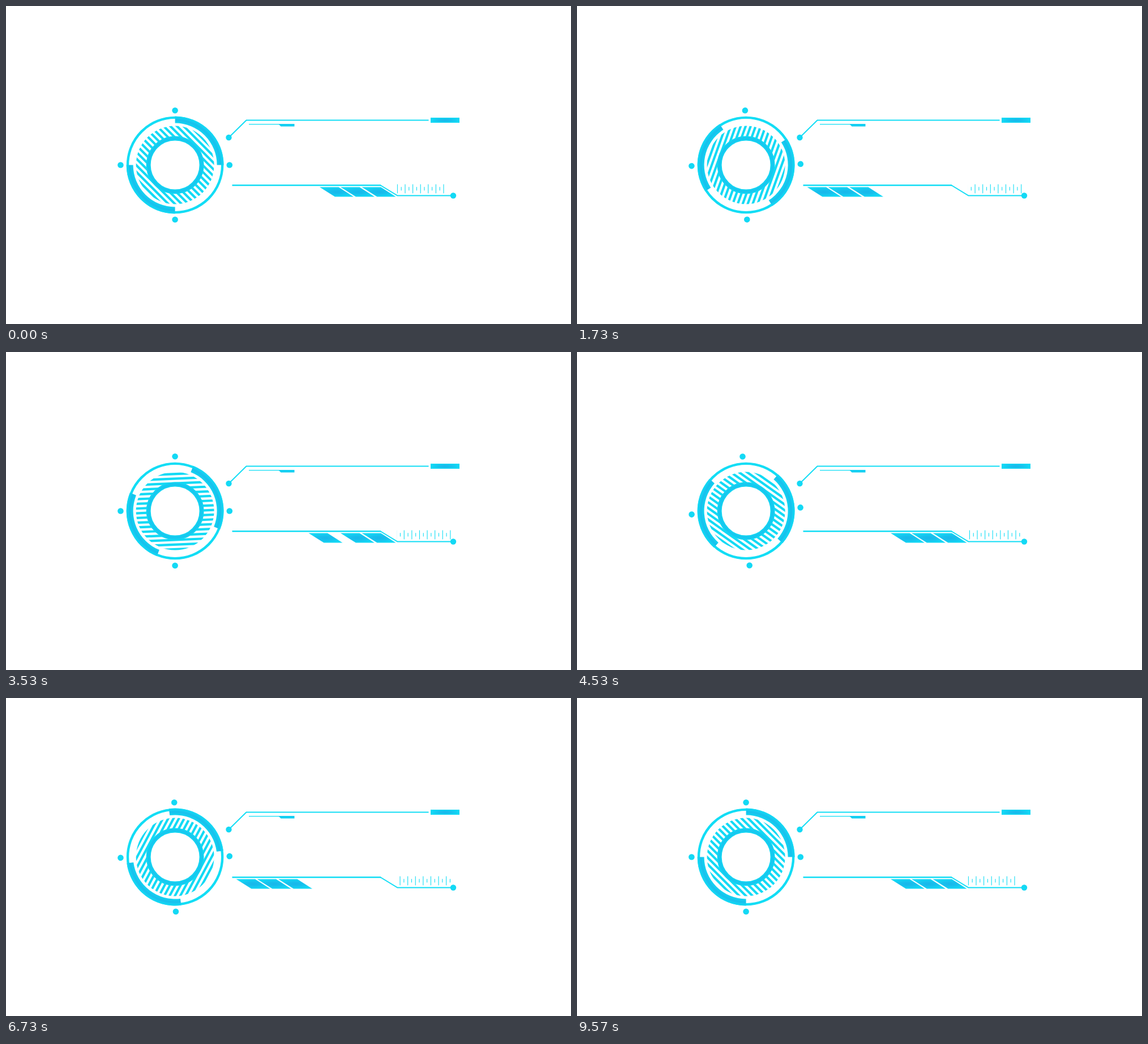
These frames come from a looping animation (998 by 561 pixels, 9.61 s). An HTML page:

```html
<!DOCTYPE html>
<html lang="en">
<head>
<meta charset="utf-8">
<title>HUD panel</title>
<style>
  html, body { margin: 0; width: 100%; height: 100%; overflow: hidden; background: #fff; }
  svg { display: block; width: 998px; height: 561px; }
  .line { fill: none; stroke: #12ddf5; }
  .dot { fill: #13d9f5; }
</style>
</head>
<body>
<svg viewBox="0 0 998 561">
  <defs>
    <radialGradient id="band" gradientUnits="userSpaceOnUse" cx="0" cy="0" r="86">
      <stop offset=".855" stop-color="#12d6f3"/>
      <stop offset=".925" stop-color="#18bfec"/>
      <stop offset="1" stop-color="#12dcf6"/>
    </radialGradient>
    <radialGradient id="hub" gradientUnits="userSpaceOnUse" cx="0" cy="0" r="51">
      <stop offset=".84" stop-color="#12d8f4"/>
      <stop offset=".92" stop-color="#18c4ee"/>
      <stop offset="1" stop-color="#12d8f4"/>
    </radialGradient>
    <radialGradient id="glow">
      <stop offset="0" stop-color="#18b6ea"/>
      <stop offset=".45" stop-color="#17c0ed"/>
      <stop offset="1" stop-color="#12d8f5"/>
    </radialGradient>
    <clipPath id="disc"><circle r="69"/></clipPath>
    <clipPath id="scale"><rect id="view" x="690.5" y="310" width="96" height="24"/></clipPath>
  </defs>

  <g transform="translate(298.6 280.5)">
    <circle class="line" r="83.6" stroke-width="4.4"/>
    <g id="arcs" fill="url(#band)">
      <path id="arc" d="M0-86A86 86 0 0 1 86 0H74A74 74 0 0 0 0-74Z"/>
      <use href="#arc" transform="rotate(180)"/>
    </g>
    <g clip-path="url(#disc)"><g id="hatch" fill="#12daf5"></g></g>
    <circle r="47" fill="#fff" stroke="url(#hub)" stroke-width="8"/>
    <g id="dots" class="dot"></g>
  </g>

  <path class="line" stroke-width="2" d="M393.5 232L424.5 201.5H746.5"/>
  <circle class="dot" cx="393.5" cy="232" r="5.2"/>
  <rect x="750" y="197" width="51" height="9" fill="url(#glow)"/>
  <path class="line" stroke-width="1.3" d="M429 208.6H483"/>
  <path fill="#13cff2" d="M481 208H509.5V212.6H485.5Z"/>

  <path class="line" stroke-width="2.4" d="M399.5 316.2H662"/>
  <path class="line" stroke-width="2" d="M661 316L691.5 334.6H790"/>
  <circle class="dot" cx="790" cy="334.5" r="5.2"/>
  <g id="bars" fill="url(#glow)"></g>
  <g clip-path="url(#scale)"><g id="ticks" class="line" stroke-width="1.1"></g></g>
</svg>
<script>
const $ = id => document.getElementById(id);
const add = (parent, tag, attrs) => {
  const el = document.createElementNS('http://www.w3.org/2000/svg', tag);
  for (const key in attrs) el.setAttribute(key, attrs[key]);
  return parent.appendChild(el);
};
const turn = (id, deg) => $(id).setAttribute('transform', `rotate(${deg.toFixed(3)})`);
const clamp = x => Math.min(1, Math.max(0, x));

// Eased progress: a Bezier curve with flat ends
function ease(x, x1 = 0.5, x2 = 0.5) {
  x = clamp(x);
  let lo = 0, hi = 1, s = 0.5;
  for (let i = 0; i < 24; i++) {
    const r = 1 - s;
    if (3 * r * r * s * x1 + 3 * r * s * s * x2 + s * s * s < x) lo = s; else hi = s;
    s = (lo + hi) / 2;
  }
  return s * s * (3 - 2 * s);
}

// Smooth curve through [position, value] pairs
function through(points, x) {
  let i = 0;
  while (i < points.length - 2 && x > points[i + 1][0]) i++;
  const slope = n => {
    const a = points[Math.max(0, n - 1)], b = points[Math.min(points.length - 1, n + 1)];
    return (b[1] - a[1]) / (b[0] - a[0]);
  };
  const [x0, y0] = points[i], [x1, y1] = points[i + 1];
  const w = x1 - x0, s = (x - x0) / w, r = 1 - s;
  return r * r * ((1 + 2 * s) * y0 + s * w * slope(i)) +
         s * s * ((3 - 2 * s) * y1 - r * w * slope(i + 1));
}

for (let i = 0; i < 17; i++)
  add($('hatch'), 'rect', { x: -70, y: -69.6 + i * 8.3, width: 140, height: 4.2 });
for (let i = 0; i < 4; i++)
  add($('dots'), 'circle', { cy: -96.2, r: 5.3, transform: `rotate(${i * 90})` });
const bars = [554, 591, 628.5].map(x => ({
  x, el: add($('bars'), 'path', { d: 'M0 319.6H33.5L60 336.6H27Z' })
}));
for (let i = -8; i < 15; i++) {
  const x = 691.4 + i * 6.8, half = i % 2 ? 3.2 : 8;
  add($('ticks'), 'path', { d: `M${x} ${322.4 - half}V${322.4 + half}` });
}

const LOOP = 9.56, HALF = LOOP / 2;
const spin = [[0, 0], [0.155, -97.5], [0.36, -303], [0.406, -367.5],
              [0.7155, -848], [0.7364, -878], [1, -1080]];
const leave = [0.12, 0.29, 0.52], comeBack = [2.97, 2.78, 2.57];

function draw(t) {
  const p = t % HALF;
  turn('arcs', through(spin, p / HALF));
  turn('hatch', 45 + 360 * t / LOOP);

  const swing = clamp((t % 3 - 0.56) / 1.34);
  turn('dots', -6 * Math.sin(Math.PI * swing) ** 2);

  bars.forEach(({ x, el }, i) => {
    const away = ease((p - leave[i]) / 0.76) - ease((p - comeBack[i]) / 0.76);
    el.setAttribute('transform', `translate(${(x - 147.5 * away).toFixed(3)})`);
  });

  const shift = 43 * ease(1 - Math.abs(t / HALF - 1), 0.5, 0.42);
  $('ticks').setAttribute('transform', `translate(${shift.toFixed(3)})`);
  $('view').setAttribute('width', Math.min(96, 86 + shift * 2));
}

// 25 poses a second, shown at 30 with every sixth one held
function tick() {
  const k = Math.min(287, Math.floor((performance.now() % 9610 + 4) * 0.03));
  draw((5 * Math.floor(k / 6) + Math.max(0, k % 6 - 1)) / 25);
  requestAnimationFrame(tick);
}
tick();
</script>
</body>
</html>
```
